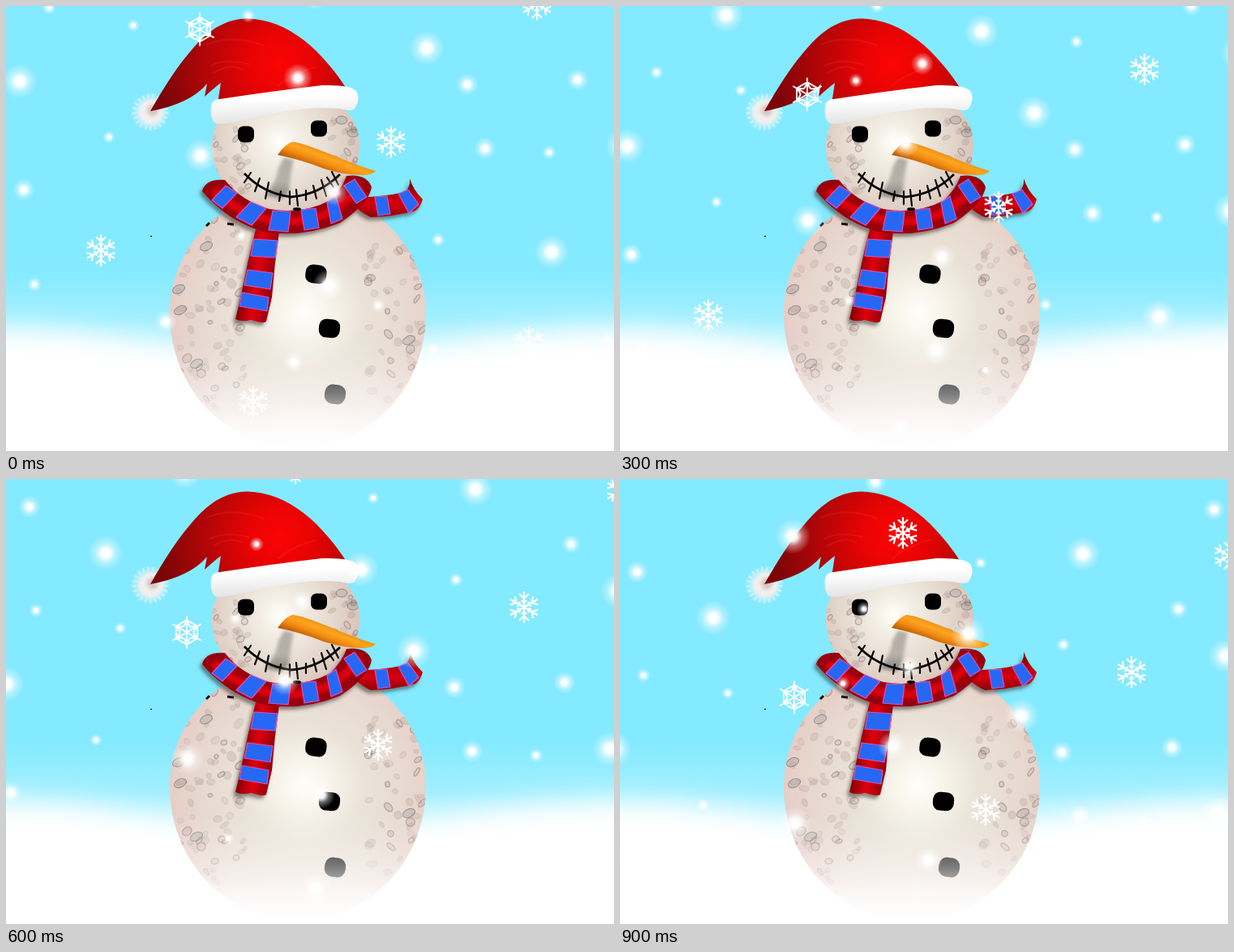
Recreate the animation shown at these times as an HTML page. Size 750 by 550 pixels, loop 1000 ms.

```html
<!DOCTYPE html>
<html lang="en">
<head>
<meta charset="utf-8">
<title>Snowman in falling snow</title>
<style>
html, body { margin: 0; width: 100%; height: 100%; overflow: hidden; background: #84eaff; }
svg { display: block; width: 100vw; height: 100vh; }
</style>
</head>
<body>
<svg viewBox="0 0 750 550" preserveAspectRatio="none">
<defs>
  <radialGradient id="glow">
    <stop offset="0" stop-color="#fff"/>
    <stop offset=".25" stop-color="#fff" stop-opacity=".95"/>
    <stop offset=".55" stop-color="#fff" stop-opacity=".4"/>
    <stop offset="1" stop-color="#fff" stop-opacity="0"/>
  </radialGradient>
  <radialGradient id="bodyFill" gradientUnits="userSpaceOnUse" cx="368" cy="380" r="165">
    <stop offset="0" stop-color="#fefefa"/>
    <stop offset=".2" stop-color="#f7f4ea"/>
    <stop offset=".45" stop-color="#ebe3d8"/>
    <stop offset=".75" stop-color="#e8dad0"/>
    <stop offset="1" stop-color="#e6cec7"/>
  </radialGradient>
  <radialGradient id="headFill" gradientUnits="userSpaceOnUse" cx="338" cy="168" r="100">
    <stop offset="0" stop-color="#fffffa"/>
    <stop offset=".25" stop-color="#f3eee4"/>
    <stop offset=".6" stop-color="#e7dcd1"/>
    <stop offset="1" stop-color="#d9c4bb"/>
  </radialGradient>
  <radialGradient id="hatFill" gradientUnits="userSpaceOnUse" cx="338" cy="72" r="150">
    <stop offset="0" stop-color="#fb0505"/>
    <stop offset=".25" stop-color="#ea0303"/>
    <stop offset=".6" stop-color="#b50507"/>
    <stop offset="1" stop-color="#7c0508"/>
  </radialGradient>
  <linearGradient id="brimFill" x1="0" y1="0" x2=".15" y2="1">
    <stop offset=".4" stop-color="#fff"/>
    <stop offset="1" stop-color="#e3e3e5"/>
  </linearGradient>
  <linearGradient id="noseFill" gradientUnits="userSpaceOnUse" x1="398" y1="179" x2="389" y2="203">
    <stop offset="0" stop-color="#e58a12"/>
    <stop offset=".35" stop-color="#ffa51f"/>
    <stop offset=".65" stop-color="#f08a12"/>
    <stop offset="1" stop-color="#b85a04"/>
  </linearGradient>
  <linearGradient id="noseShade" x1="0" y1="0" x2="0" y2="1">
    <stop offset="0" stop-color="#8d8882" stop-opacity=".65"/>
    <stop offset=".6" stop-color="#8d8882" stop-opacity=".55"/>
    <stop offset="1" stop-color="#5c5855" stop-opacity=".75"/>
  </linearGradient>
  <linearGradient id="dropFill" gradientUnits="userSpaceOnUse" x1="293" y1="330" x2="331" y2="335">
    <stop offset="0" stop-color="#8c0006"/>
    <stop offset=".45" stop-color="#e00408"/>
    <stop offset="1" stop-color="#90000a"/>
  </linearGradient>
  <linearGradient id="tailFill" x1="0" y1="0" x2="0" y2="1">
    <stop offset=".2" stop-color="#8e0006"/>
    <stop offset=".65" stop-color="#d80408"/>
    <stop offset="1" stop-color="#8e0006"/>
  </linearGradient>
  <linearGradient id="haze" gradientUnits="userSpaceOnUse" x1="0" y1="325" x2="0" y2="450">
    <stop offset="0" stop-color="#fff" stop-opacity="0"/>
    <stop offset=".5" stop-color="#fff" stop-opacity=".25"/>
    <stop offset="1" stop-color="#fff"/>
  </linearGradient>
  <linearGradient id="fadeFill" gradientUnits="userSpaceOnUse" x1="0" y1="410" x2="0" y2="545">
    <stop offset="0" stop-color="#fff"/>
    <stop offset=".26" stop-color="#ccc"/>
    <stop offset=".52" stop-color="#808080"/>
    <stop offset=".8" stop-color="#1e1e1e"/>
    <stop offset="1" stop-color="#000"/>
  </linearGradient>
  <mask id="fade" maskUnits="userSpaceOnUse" x="0" y="0" width="750" height="550">
    <rect width="750" height="550" fill="url(#fadeFill)"/>
  </mask>
  <filter id="soft" x="-20%" y="-50%" width="140%" height="200%"><feGaussianBlur stdDeviation="18"/></filter>
  <filter id="blur2" x="-30%" y="-30%" width="160%" height="160%"><feGaussianBlur stdDeviation="2"/></filter>
  <filter id="blur1" x="-30%" y="-30%" width="160%" height="160%"><feGaussianBlur stdDeviation=".7"/></filter>
  <filter id="shadow" x="-10%" y="-10%" width="120%" height="125%">
    <feDropShadow dx="-3" dy="4" stdDeviation="2.2" flood-color="#333" flood-opacity=".55"/>
  </filter>
  <path id="bodyShape" d="M202 380 C202 293 273 227 360 227 S518 293 518 380 C518 473 447 546 360 546 S202 473 202 380Z"/>
  <path id="headShape" d="M254 174 C254 130 290 105 345 105 S436 130 436 172 C436 220 398 254 346 254 S254 220 254 174Z"/>
  <clipPath id="inBody"><use href="#bodyShape"/></clipPath>
  <clipPath id="inHead"><use href="#headShape"/></clipPath>
</defs>

<rect width="750" height="550" fill="#84eaff"/>
<rect y="325" width="750" height="225" fill="url(#haze)"/>
<path filter="url(#soft)" fill="#fff" d="M-90 402 C40 394 120 408 200 428 C300 445 450 445 540 425 C610 408 680 399 840 395 V640 H-90Z"/>

<g mask="url(#fade)">
  <use href="#bodyShape" fill="url(#bodyFill)"/>
  <g id="bodySpots" clip-path="url(#inBody)" filter="url(#blur1)"></g>
  <rect x="369.500" y="320" width="26" height="23" rx="9" transform="rotate(8 383 331)"/>
  <rect x="386" y="387" width="26" height="23" rx="9" transform="rotate(5 399 398)"/>
  <rect x="393" y="468" width="26" height="24" rx="10" transform="rotate(8 406 480)"/>
</g>
<path d="M247 272l4-4M273 269l8 1" stroke="#111" stroke-width="3"/>
<rect x="178" y="284" width="2" height="1"/>

<use href="#headShape" fill="url(#headFill)"/>
<g id="headSpots" clip-path="url(#inHead)" filter="url(#blur1)"></g>

<g filter="url(#shadow)">
  <path fill="url(#tailFill)" d="M432 236 Q460 237 492 230 Q499 224 498 213 Q502 227 514 239 Q511 249 505 253 Q480 260 450 261 Q440 257 428 246Z"/>
  <path fill="url(#dropFill)" d="M308 276 L337 279 Q331 320 328 360 L321 390 Q318 393 302 388 Q290 391 283 387 Q293 345 298 318Z"/>
  <path fill="#970008" d="M242 229 Q246 213 270 215 Q290 241 325 251 Q367 258 400 240 Q415 225 420 210 Q445 207 451 224 Q447 245 412 268 Q365 287 318 279 Q273 266 242 229Z"/>
  <path d="M256 227 Q285 257 333 266 Q383 270 415 244 Q430 232 437 221" fill="none" stroke="#dd0509" stroke-width="10" filter="url(#blur2)"/>
  <g id="stripes" fill="#2868f4" stroke="#e04fc0" stroke-width="1.200" stroke-linejoin="round"></g>
</g>

<path d="M343 187 L355 190 Q350 210 349 230 L340 238 L320 234 Q335 215 336 200Z" fill="url(#noseShade)" filter="url(#blur2)"/>
<path d="M294 207 Q318 232 352 236 Q387 233 412 208" fill="none" stroke="#080808" stroke-width="2.800"/>
<path id="stitches" fill="none" stroke="#080808" stroke-width="2.200" stroke-linecap="round"/>
<ellipse cx="359" cy="251" rx="5" ry="2"/>
<rect x="286" y="148.500" width="20" height="20" rx="7"/>
<rect x="376" y="141.500" width="20" height="20" rx="7"/>
<path fill="url(#noseFill)" d="M335 184 Q345 170 353 168 Q360 167 400 183 Q430 196 456 204 Q452 209 440 209 Q418 209 392 201 Q365 190 335 184Z"/>

<circle cx="178" cy="131" r="25" fill="url(#glow)"/>
<circle cx="178" cy="131" r="20" fill="none" stroke="#f5f5f5" stroke-width="5" stroke-dasharray="2 4" opacity=".6" filter="url(#blur1)"/>
<circle cx="179" cy="131" r="16" fill="#f2efed" filter="url(#blur2)"/>
<circle cx="181" cy="129" r="7" fill="#d3c6c4" filter="url(#blur2)"/>
<path fill="url(#hatFill)" d="M178 130 Q204 84 225 59 C248 30 270 16 298 15.500 C349 17 390 55 422 105 L261 121 L265 95 Q257 101 245 112 L248 96 Q227 121 178 130Z"/>
<g fill="none" stroke="#ff5b50" stroke-opacity=".14" stroke-width="2" filter="url(#blur1)">
  <path d="M247 48 Q280 34 318 49M252 74 Q270 64 300 72M255 83 Q278 70 292 79M335 99 Q352 84 383 75"/>
</g>
<path fill="url(#brimFill)" d="M253 123 Q254 116 264 115 Q330 105 390 98 Q425 97 432 105 Q438 114 430 127 Q426 131 412 127 Q370 123 315 136 Q285 144 262 146 Q251 145 253 123Z"/>

<g id="snow"></g>
</svg>

<script>
const NS = 'http://www.w3.org/2000/svg';
const $ = id => document.getElementById(id);

function add(parent, tag, attrs) {
  const el = document.createElementNS(NS, tag);
  for (const key in attrs) el.setAttribute(key, attrs[key]);
  parent.appendChild(el);
  return el;
}

let seed = 17;
function rand(lo, hi) {
  seed = (seed * 16807) % 2147483647;
  return lo + (hi - lo) * seed / 2147483647;
}

// Mottled patches on the snow: filled smudges with a few darker rings
function speckle(parent, count, x0, x1, y0, y1, big) {
  for (let i = 0; i < count; i++) {
    const x = rand(x0, x1), y = rand(y0, y1), ring = i % 4 === 0;
    add(parent, 'ellipse', {
      cx: x, cy: y, rx: rand(2.5, big), ry: rand(2, big * .75),
      transform: `rotate(${rand(-60, 60)} ${x} ${y})`,
      fill: '#a58c88', 'fill-opacity': rand(.1, .24),
      stroke: '#6e5c5a', 'stroke-opacity': ring ? .4 : .1, 'stroke-width': 1.3
    });
  }
}
speckle($('bodySpots'), 58, 206, 290, 262, 455, 7);
speckle($('bodySpots'), 52, 440, 515, 285, 490, 7);
speckle($('bodySpots'), 14, 225, 300, 440, 500, 5);
speckle($('headSpots'), 26, 256, 300, 145, 230, 5.5);
speckle($('headSpots'), 18, 400, 434, 128, 205, 6);
for (const [x, y] of [[213, 350], [215, 376], [235, 442], [247, 297], [497, 413]])
  add($('bodySpots'), 'ellipse', { cx: x, cy: y, rx: 8, ry: 5, fill: '#8884', stroke: '#555', 'stroke-opacity': .5, transform: `rotate(-25 ${x} ${y})` });
for (const [x, y] of [[414, 141], [428, 157]])
  add($('headSpots'), 'ellipse', { cx: x, cy: y, rx: 7, ry: 5, fill: '#8884', stroke: '#555', 'stroke-opacity': .5 });

for (const points of [
  '271,222 285,231 267,250 254,240', '302,242 321,250 303,271 284,261',
  '329,253 351,254 348,279 324,277', '364,252 382,250 386,274 368,277',
  '396,243 407,235 415,263 401,269', '417,222 430,214 445,236 432,244',
  '455,236 470,235 474,257 459,259', '484,232 496,227 509,245 497,256',
  '306,288 335,290 332,311 302,309', '298,326 329,330 326,350 294,345',
  '291,354 324,360 322,377 288,371'
]) add($('stripes'), 'polygon', { points });

// Stitches lean across the smile
$('stitches').setAttribute('d', [
  [298, 212, 4], [310, 221, 3], [322, 228, 2], [338, 235, 1], [350, 237, 0], [359, 237, -1],
  [370, 234, 0], [381, 230, -2], [392, 225, -3], [400, 218, -4], [406, 213, -4]
].map(([x, y, lean], i) => {
  const h = 6 + i % 3 * 2;
  return `M${x + lean} ${y - h}L${x - lean} ${y + h}`;
}).join(''));

// Falling snow: x, y, radius at the start of the loop
const dots = [
  [53, 2, 9], [157, 24, 8], [299, 12, 9], [519, 52, 22], [569, 97, 14], [705, 91, 14],
  [17, 93, 22], [360, 89, 18], [127, 162, 8], [240, 185, 21], [591, 176, 14], [670, 181, 9],
  [761, 173, 22], [22, 227, 14], [533, 289, 9], [673, 304, 22], [35, 344, 9], [197, 390, 14],
  [527, 424, 9], [742, 412, 9], [405, 230, 17], [290, 284, 8], [398, 345, 20], [459, 370, 9],
  [355, 440, 13], [381, -9, 14], [139, -69, 22], [454, -49, 22], [571, -36, 9], [713, -80, 12],
  [325, -80, 9], [45, -126, 14], [237, -170, 22], [469, -137, 8], [595, -148, 22],
  [757, -203, 14], [339, -237, 14], [771, -22, 22]
];
const flakes = [
  [475, 168], [117, 302], [655, -2], [645, 416], [305, 489], [373, -174], [775, -146]
];
const snow = $('snow');
for (const [cx, cy, r] of dots) add(snow, 'circle', { cx, cy, r, fill: 'url(#glow)' });

function flake(x, y, arm, width) {
  const g = add(snow, 'g', { transform: `translate(${x} ${y})`, fill: 'none', stroke: '#fff', 'stroke-width': width });
  for (let a = 0; a < 360; a += 60) add(g, 'path', { d: arm, transform: `rotate(${a})` });
}
for (const [x, y] of flakes) flake(x, y, 'M0 0V-19.500M-6 -16.500L0 -11L6 -16.500M-3 -8.500L0 -5.500L3 -8.500', 2.3);
flake(239, 29, 'M0 0V-20.500M-6.500 -11.300L0 -15L6.500 -11.300M-4 -7L0 -14L4 -7', 2);

const STEP = 100, STEPS = 10, DRIFT = -2.67, FALL = 26.75;

function draw(time) {
  const k = Math.floor(time / STEP) % STEPS;
  snow.setAttribute('transform', `translate(${k * DRIFT} ${k * FALL})`);
}

const start = performance.now();
function tick() {
  draw(performance.now() - start);
  requestAnimationFrame(tick);
}
tick();
</script>
</body>
</html>
```
